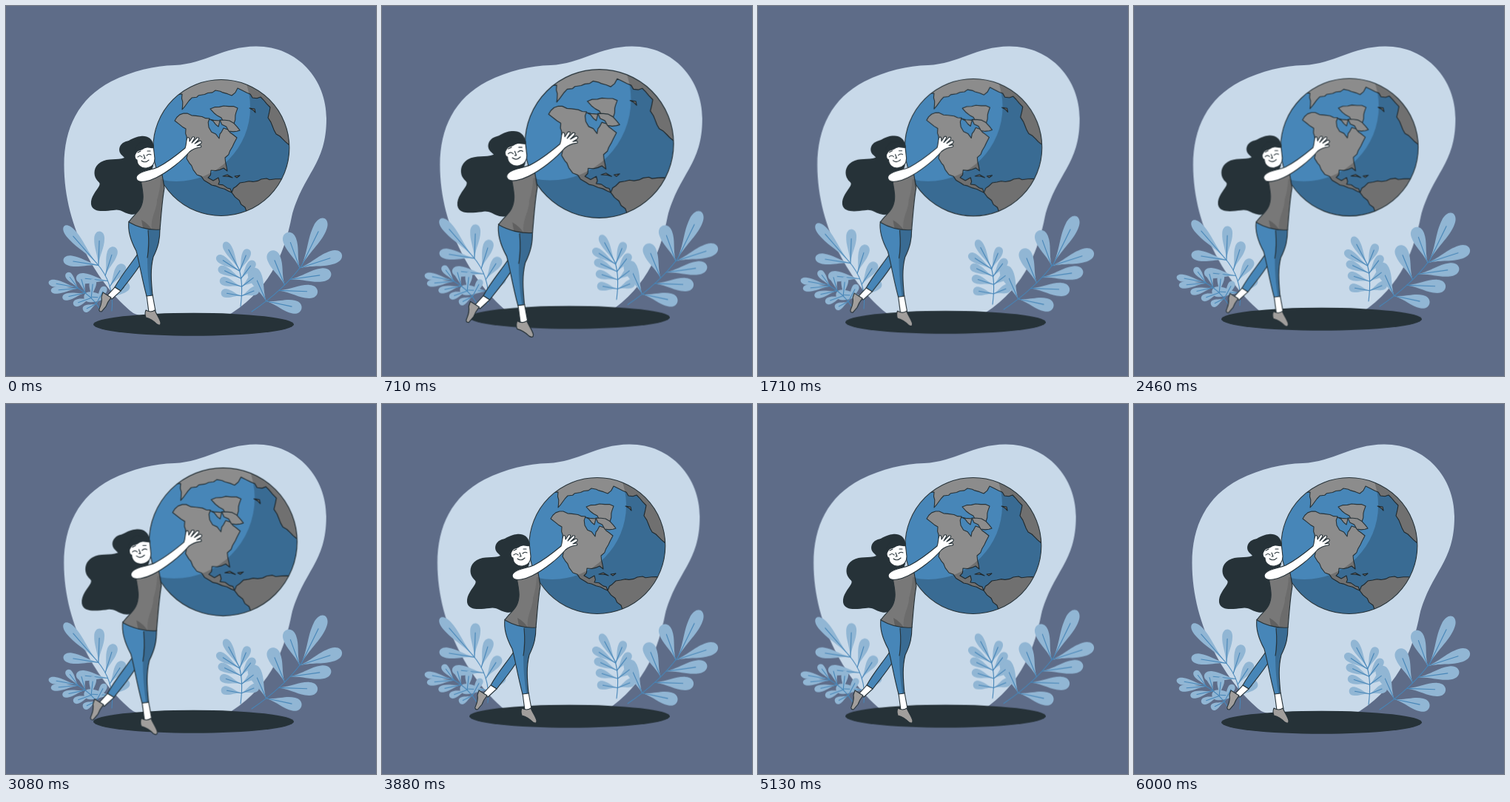
These frames come from a looping animation (500x500 px, 6040 ms). An HTML page:

```html
<!DOCTYPE html>
<html lang="en">
<head>
<meta charset="utf-8">
<title>Hugging the globe</title>
<style>
  html, body { margin: 0; width: 100%; height: 100%; overflow: hidden; background: #5e6c88; }
  svg { display: block; width: 100vw; height: 100vh; }
  .shake { animation: shake 3s linear infinite; }
  .float { animation: float 1.5s linear infinite; }
  .beat { animation: beat 6s linear infinite; transform-origin: 260px 252px; }
  @keyframes shake {
    10%, 90% { transform: translateX(-1px); }
    20%, 80% { transform: translateX(2px); }
    30%, 50%, 70% { transform: translateX(-4px); }
    40%, 60% { transform: translateX(4px); }
  }
  @keyframes float {
    0%, 100% { transform: translateY(0); }
    50% { transform: translateY(-10px); }
  }
  @keyframes beat {
    0%, 30%, 40%, 60%, 100% { transform: scale(1); }
    10%, 50% { transform: scale(1.1); }
  }
  .leaf { fill: #91b6d4; }
  .stem { fill: none; stroke: #4786b8; stroke-width: 1.1; stroke-linecap: round; }
  .ink { stroke: #263238; stroke-width: 1.1; stroke-linejoin: round; stroke-linecap: round; }
  .dark { fill: #263238; }
  .blue { fill: #4786b8; }
  .land { fill: #8c8c8c; }
  .shirt { fill: #787878; }
  .shoe { fill: #a19e9c; }
  .skin { fill: #fff; }
  .line { fill: none; }
  .shade { fill: #000; fill-opacity: .2; }
  .soft { fill: #000; fill-opacity: .1; }
</style>
</head>
<body>
<svg viewBox="0 0 500 500">
  <defs>
    <clipPath id="ball"><circle cx="290.8" cy="191.5" r="92"/></clipPath>
  </defs>

  <path class="shake" fill="#c8d9e9" d="M78.5 215C78.5 165 98 125 142 102C172 87 200 81 228 80C270 78 292 55 338 54.5C395 54.5 433 100 433 152C433 215 402 225 386 285C378 325 362 378 305 415C280 428 200 428 172 415C125 378 78.5 300 78.5 215Z"/>

  <g class="float" id="plants"></g>
  <ellipse class="float dark" cx="253.5" cy="430.3" rx="135.5" ry="15.5"/>

  <g class="beat">
    <g clip-path="url(#ball)">
      <circle class="blue" cx="290.8" cy="191.5" r="92"/>
      <g class="land ink" id="land"></g>
      <path class="shade" fill-rule="evenodd" d="M190 90H390V290H190ZM130 137a100 100 0 1 0 200 0a100 100 0 1 0 -200 0Z"/>
    </g>
    <circle class="line ink" cx="290.8" cy="191.5" r="92"/>

    <!-- hair -->
    <path class="dark" d="M200 190C198 178 190 175 182 176C172 177 168 182 162 183C153 186 150 196 157 202L160 205C150 209 138 205 128 211C118 217 118 228 122 234C125 239 128 238 126 243C122 250 114 258 115 268C117 280 134 277 145 276C153 274 158 278 163 280C172 284 182 281 186 273L192 235L199 216Z"/>

    <!-- far leg -->
    <path class="blue ink" d="M178 335C168 350 157 362 147 380L155 385C164 373 174 362 183 347Z"/>
    <path class="skin ink" d="M147 380L137 391L143 396L155 385Z"/>
    <path class="shoe ink" d="M131 387L142 394Q137 400 135 406L129 413Q124 413 127 407Q130 400 129 393Z"/>

    <!-- near leg -->
    <path class="skin ink" d="M190 391L193 414L202 412L198 390Z"/>
    <path class="shoe ink" d="M189 411Q196 415 201 411C204 418 208 423 209 428Q209 433 204 430Q197 423 189 421Q187 416 189 411Z"/>
    <path class="blue ink" d="M166 291C164 306 170 320 176 331C180 345 183 366 190 392L198 391C196 370 195 355 199 339C206 325 208 315 208 301Z"/>
    <path class="shade" d="M192 302L208 302C208 315 206 325 199 339C195 355 196 370 198 391L195 391C191 366 190 340 192 320Z"/>
    <path class="line ink" d="M192 303Q194 325 191 340"/>

    <!-- shirt -->
    <path class="shirt ink" d="M182 234C184 248 188 260 182 272C178 280 170 285 166 292C178 299 194 303 208 302C210 280 211 262 214 246L211 228Z"/>
    <path class="soft" d="M214 234V246C211 262 210 280 208 302L197 302C195 285 204 276 204 262Q208 250 209 234Z"/>
    <path class="shade" d="M183 289Q192 294 197 302L185 300Z"/>

    <!-- face -->
    <path class="skin ink" d="M177 195C173 198 173 207 177 208C177 215 183 220 190 219C197 218 201 213 201 206L199 188Z"/>
    <path class="dark" d="M173 204C172 195 175 189 182 184L199 186L200 192C195 193 191 190 187 192C184 196 178 194 176 199Z"/>
    <path class="line ink" d="M178 204q3-3 6 0M190 202q3-3 6-1M186 201l2 5h-2M183 209q5 4 10-1M178 198l4-2M191 196l4 0"/>

    <!-- arm -->
    <path class="skin ink" d="M178 228C184 222 196 222 205 218C219 211 230 202 242 192C244 187 243 183 245 178Q248 176 248 183L252 177Q256 176 254 180L251 185L258 178Q262 177 260 181L255 186L262 182Q266 183 263 186L258 189L263 188Q265 191 262 191Q254 192 248 197C238 209 219 224 203 232C193 237 182 239 178 236Q174 232 178 228Z"/>
  </g>
</svg>
<script>
  const LOOP = 6040;
  const mix = (a, b, t) => a + (b - a) * t;
  const rad = deg => deg * Math.PI / 180;

  let seed = 7;
  const rand = () => (seed = seed * 16807 % 2147483647) / 2147483647;

  // Coasts: a few key points, with a jittered point on every long edge.
  const coasts = [
    '225 121 238 119 238 140 251 124 283 114 305 121 313 111 325 117 333 124 344 123 357 137 354 151 365 173 383 188 400 170 380 80 250 80',
    '276 139 294 135 313 138 308 159 294 157',
    '228 155 240 145 275 152 274 164 288 179 294 165 312 178 306 190 296 205 299 223 294 219 277 222 273 232 280 236 287 232 287 241 303 247 305 252 278 242 258 228 244 206 243 166',
    '275 153 289 155 287 163',
    '289 154 302 155 316 168 301 169',
    '293 230 299 228 306 232',
    '309 230 316 229 312 232',
    '305 252 316 239 345 234 376 234 370 260 340 290 325 284 323 272',
    '329 138 336 139 337 144'
  ];

  function coast(text) {
    const nums = text.split(' ').map(Number), n = nums.length;
    let d = '';
    for (let i = 0; i < n; i += 2) {
      const x = nums[i], y = nums[i + 1], nx = nums[(i + 2) % n], ny = nums[(i + 3) % n];
      const steps = Math.max(1, Math.round(Math.hypot(nx - x, ny - y) / 6));
      for (let k = 0; k < steps; k++) {
        const wobble = k ? 3 : 0;
        d += `${d ? 'L' : 'M'}${mix(x, nx, k / steps) + (rand() - .5) * wobble} ` +
          `${mix(y, ny, k / steps) + (rand() - .5) * wobble}`;
      }
    }
    return `<path d="${d}Z"/>`;
  }

  // stem: root, bend and end; top: angle and length of the end leaf;
  // sides: leaf count, then angle and length from the lowest leaf to the highest.
  const plants = [
    { stem: [332, 413, 375, 384, 400, 350], w: 9, top: [-64, 70],
      sides: [[3, -114, -110, 49, 51], [4, 12, -18, 49, 60]] },
    { stem: [317, 406, 321, 375, 315, 356], w: 5.8, top: [242, 42],
      sides: [[4, 190, 213, 28, 37], [4, -22, -68, 25, 32]] },
    { stem: [143, 412, 147, 375, 122, 347], w: 7, top: [229, 66],
      sides: [[3, 183, 189, 38, 48], [4, -42, -88, 30, 46]] },
    { stem: [128, 411, 117, 392, 95, 380], w: 4.8, top: [190, 38],
      sides: [[4, 153, 175, 20, 37], [4, 298, 233, 26, 26]] }
  ];

  function leaf(x, y, angle, len, w) {
    const c = Math.cos(rad(angle)), s = Math.sin(rad(angle));
    const at = (u, v) =>
      `${(x + c * len * u - s * w * v).toFixed(1)} ${(y + s * len * u + c * w * v).toFixed(1)} `;
    const shape = `M${at(0, 0)}C${at(.35, .25)}${at(.5, 1)}${at(.78, 1)}` +
      `C${at(1.07, 1)}${at(1.07, -1)}${at(.78, -1)}C${at(.5, -1)}${at(.35, -.25)}${at(0, 0)}Z`;
    return `<path class="leaf" d="${shape}"/><path class="stem" d="M${at(0, 0)}L${at(.72, 0)}"/>`;
  }

  function plant({ stem, w, top, sides }) {
    const [x0, y0, x1, y1, x2, y2] = stem;
    const on = (a, b, c, t) => mix(mix(a, b, t), mix(b, c, t), t);
    let out = leaf(x2, y2, ...top, w);
    for (const [n, a0, a1, l0, l1] of sides) {
      for (let i = 0; i < n; i++) {
        const k = i / (n - 1), t = mix(.24, .94, k);
        out += leaf(on(x0, x1, x2, t), on(y0, y1, y2, t), mix(a0, a1, k), mix(l0, l1, k), w);
      }
    }
    return out + `<path class="stem" d="M${x0} ${y0}Q${x1} ${y1} ${x2} ${y2}"/>`;
  }

  const fill = (id, parts) => { document.getElementById(id).innerHTML = parts.join(''); };
  fill('land', coasts.map(coast));
  fill('plants', plants.map(plant));

  // Restart all cycles together at the end of each loop.
  const moves = document.getAnimations();
  moves.forEach(m => m.pause());
  const start = performance.now();
  function tick() {
    const t = (performance.now() - start) % LOOP;
    moves.forEach(m => { m.currentTime = t; });
    requestAnimationFrame(tick);
  }
  tick();
</script>
</body>
</html>
```
